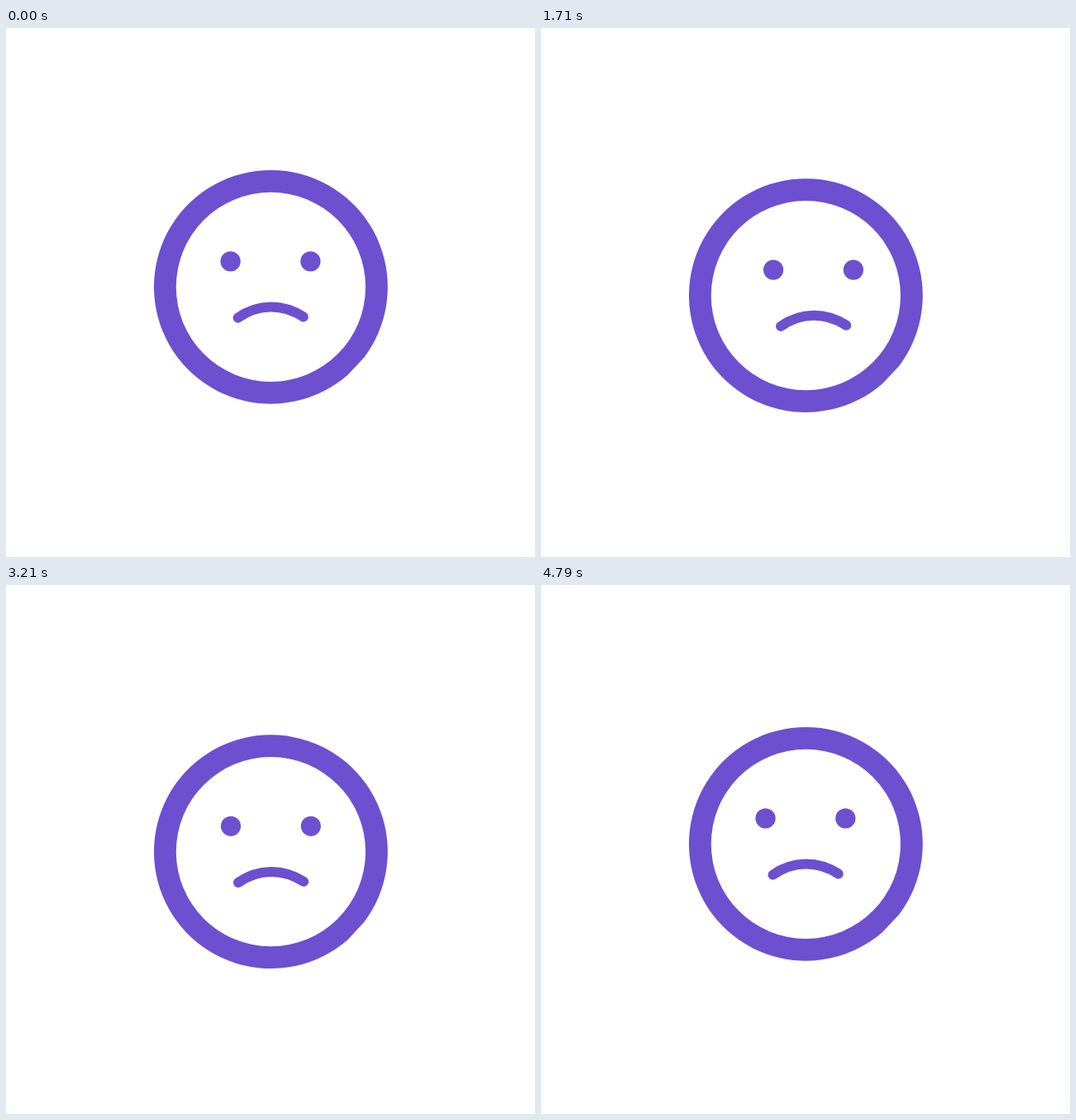
Recreate the animation shown at these times as an HTML page. Size 640x640 px, loop 4870 ms.

```html
<!DOCTYPE html>
<html lang="en">
<head>
<meta charset="utf-8">
<title>Sad face</title>
<style>
  html, body { margin: 0; height: 100%; overflow: hidden; background: #fff; }
  svg { display: block; width: 100vw; height: 100vh; }
</style>
</head>
<body>
<svg viewBox="0 0 640 640" fill="#6c50d0">
  <g id="head">
    <path id="ring" fill-rule="evenodd"/>
    <g id="face">
      <circle cx="271.6" cy="282.4" r="12.1"/>
      <circle cx="368.4" cy="282.4" r="12.1"/>
      <path d="M280.6 350.6C305 333.4 335 333.4 359.7 349.4" fill="none"
            stroke="#6c50d0" stroke-width="12.1" stroke-linecap="round"/>
    </g>
  </g>
</svg>
<script>
  const LOOP = 4870, FPS = 14;
  const CX = 320.4, CY = 313.3, OUTER = 141.4, INNER = 114.6;
  const get = id => document.getElementById(id);
  const head = get('head'), face = get('face');

  const rim = degrees => {
    const a = degrees * Math.PI / 180;
    return `${CX + OUTER * Math.cos(a)} ${CY + OUTER * Math.sin(a)}`;
  };
  const half = side => `a${INNER} ${INNER} 0 0 1 ${side * 2 * INNER} 0`;

  // The outer rim is slightly flattened at the lower right.
  get('ring').setAttribute('d',
    `M${rim(49)}A${OUTER} ${OUTER} 0 1 1 ${rim(37)}Z` +
    `M${CX - INNER} ${CY}${half(1)}${half(-1)}Z`);

  // Eased progress from 0 to 1 between two times
  const ease = (t, from, to) => {
    const u = Math.min(1, Math.max(0, (t - from) / (to - from)));
    return u * u * (3 - 2 * u);
  };

  function draw(now) {
    const t = Math.floor((now % LOOP + 5) * FPS / 1000) * 1000 / FPS;
    const drop = 12.8 * (ease(t, 0, 2400) - ease(t, 2400, 4800));
    const glance = 9.6 * (ease(t, 1000, 1620) - ease(t, 1620, 3440));
    head.setAttribute('transform', `translate(0 ${drop})`);
    face.setAttribute('transform', `translate(${glance} 0)`);
    requestAnimationFrame(() => draw(performance.now()));
  }
  draw(0);
</script>
</body>
</html>
```
